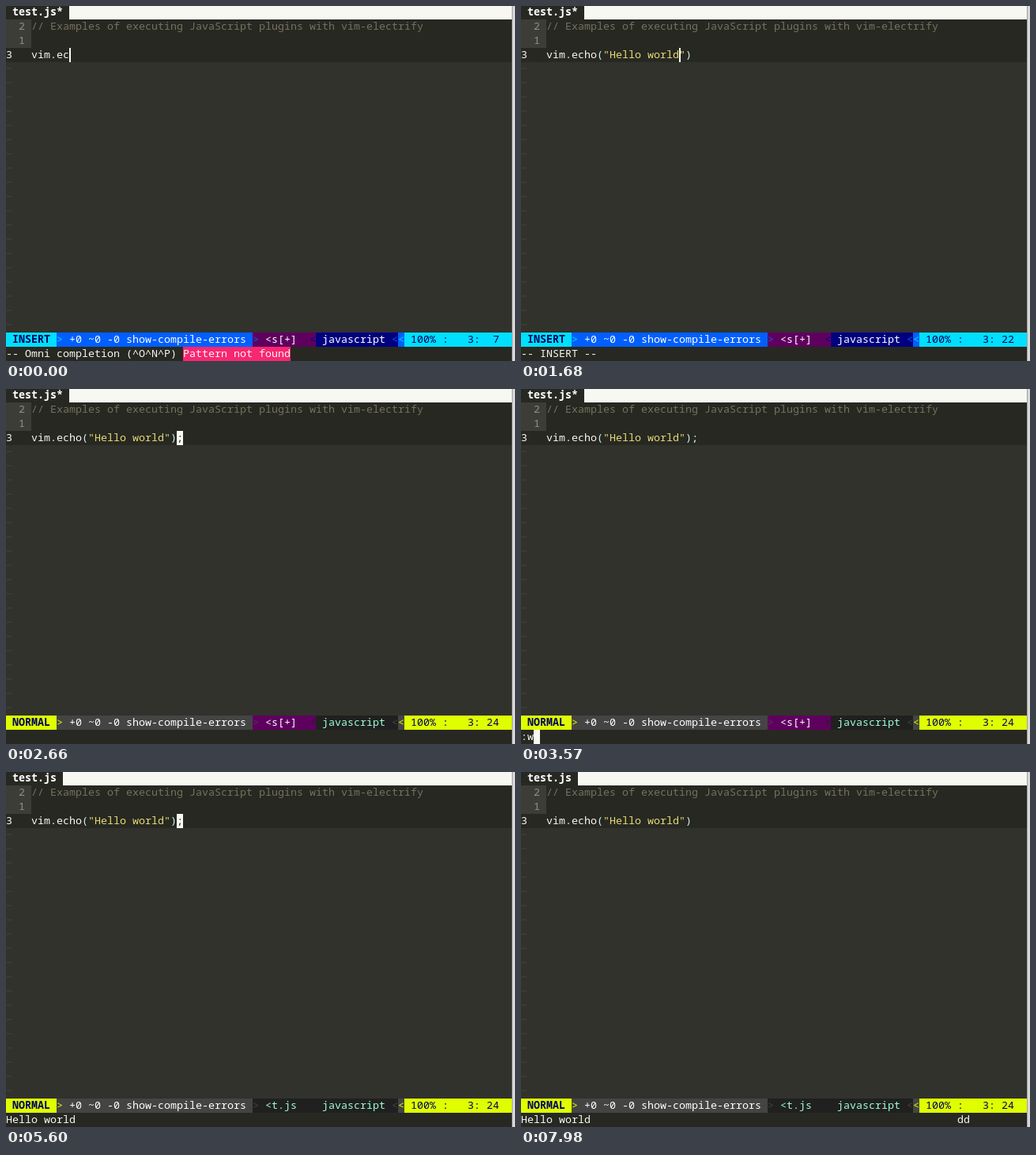
Recreate the animation shown at these times as an HTML page with a canvas. Size 644 px wide and 449 px high, loop 8000 ms.

```html
<!DOCTYPE html>
<html lang="en">
<head>
<meta charset="utf-8">
<title>Editor session</title>
<style>
html, body { margin: 0; width: 100%; height: 100%; overflow: hidden; background: #272822; }
canvas { display: block; }
</style>
</head>
<body>
<canvas id="stage" width="644" height="449"></canvas>
<script>
(() => {
const ctx = document.getElementById("stage").getContext("2d", { alpha: false });
const LOOP = 8000, CW = 8, RH = 18;
const FONT = '13.3333px "Noto Sans Mono", "DejaVu Sans Mono", monospace';
const BG = "#272822", FG = "#f8f8f2", STRING = "#e6db74", PAREN = "#d4f2ee";
const COMMENT = "#75715e", GUTTER = "#3c3d37", EMPTY = "#31322c";
const CALL = 'vim.echo("Hello world")';

const THEMES = {
  INSERT: { a: "#00dfff", b: "#005fff", c: "#000080", ink: "#00005f", text: "#ffffff" },
  NORMAL: { a: "#dfff00", b: "#444444", c: "#202020", ink: "#00005f", text: "#9cffd3" }
};

const initial = {
  code: "vim.ec", col: 7, mode: "INSERT", cursor: "bar",
  dirty: true, msg: "-- Omni completion (^O^N^P) ", error: "Pattern not found", keys: ""
};

// Each step changes part of the state at its time.
const steps = [
  [70, { code: "vim.ech", col: 8 }],
  [210, { code: "vim.echo", col: 9 }],
  [350, { code: "vim.echo()", col: 10, msg: "-- INSERT --", error: "" }],
  [560, { code: 'vim.echo("")', col: 11 }]
];
[770, 840, 980, 1050, 1190, 1260, 1400, 1470, 1540, 1610, 1680].forEach((t, i) => {
  steps.push([t, { code: 'vim.echo("' + "Hello world".slice(0, i + 1) + '")', col: 12 + i }]);
});
steps.push(
  [1960, { mode: "NORMAL", cursor: "block", col: 21, msg: "" }],
  [2170, { mode: "INSERT", cursor: "bar", col: 24, msg: "-- INSERT --" }],
  [2310, { code: CALL + ";", col: 25 }],
  [2590, { mode: "NORMAL", cursor: "block", col: 24 }],
  [2660, { msg: "" }],
  [3290, { cursor: "command", msg: ":" }],
  [3430, { msg: ":w" }],
  [3640, { cursor: "block", dirty: false, msg: '"test.js" 3L, 92C written' }],
  [3920, { cursor: "command", msg: ":" }],
  [4060, { msg: ":S" }],
  [4200, { msg: ":So" }],
  [4270, { msg: ":Sou" }],
  [4410, { msg: ":SourceJs" }],
  [5040, { cursor: "none" }],
  [5250, { cursor: "command" }],
  [5530, { cursor: "block", msg: "" }],
  [5600, { msg: "Hello world" }]
);
for (const [off, on] of [[6160, 6370], [6720, 6930], [7350, 7560]]) {
  steps.push([off, { cursor: "none" }], [on, { cursor: "block" }]);
}
steps.push(
  [7840, { cursor: "half", keys: "d" }],
  [7980, { cursor: "none", code: CALL, keys: "dd" }]
);

function stateAt(t) {
  const s = { ...initial };
  for (const [at, change] of steps) if (at <= t) Object.assign(s, change);
  return s;
}

const rowTop = row => row * RH - 1;

function fill(col, row, count, color) {
  ctx.fillStyle = color;
  ctx.fillRect(col * CW, rowTop(row), count * CW, RH);
}

function write(text, col, row, color, bold) {
  ctx.font = (bold ? "bold " : "") + FONT;
  ctx.fillStyle = color;
  [...text].forEach((ch, i) => ctx.fillText(ch, (col + i) * CW, rowTop(row) + 13));
}

function drawTab(s) {
  const name = " test.js" + (s.dirty ? "* " : " ");
  fill(0, 0, 80, FG);
  fill(0, 0, name.length, BG);
  write(name, 0, 0, "#ffffff", true);
}

function drawCode(s) {
  fill(0, 1, 4, GUTTER);
  fill(0, 2, 4, GUTTER);
  write("2", 2, 1, "#90908a");
  write("1", 2, 2, "#90908a");
  write("// Examples of executing JavaScript plugins with vim-electrify", 4, 1, COMMENT);
  write("3", 0, 3, FG);
  const first = s.code.indexOf('"'), last = s.code.lastIndexOf('"');
  [...s.code].forEach((ch, i) => {
    const quoted = first >= 0 && i >= first && i <= last;
    const color = quoted ? STRING : "()".includes(ch) ? PAREN : FG;
    write(ch, 4 + i, 3, color);
  });
  for (let row = 4; row < 23; row++) {
    fill(0, row, 80, EMPTY);
    write("~", 0, row, "#49483e");
  }
}

function drawStatus(s) {
  const th = THEMES[s.mode], row = 23;
  const fileBg = s.dirty ? "#5f005f" : th.c;
  fill(0, row, 8, th.a);
  fill(8, row, 31, th.b);
  fill(39, row, 10, fileBg);
  fill(49, row, 13, th.c);
  fill(62, row, 1, th.b);
  fill(63, row, 17, th.a);
  write(s.mode, 1, row, th.ink, true);
  write(">", 8, row, th.a);
  write("+0 ~0 -0 show-compile-errors", 10, row, "#ffffff");
  write(">", 39, row, th.b);
  write(s.dirty ? "<s[+]" : "<t.js", 41, row, s.dirty ? "#ffffff" : th.text);
  write("<", 48, row, th.c);
  write("javascript", 50, row, th.text);
  write("<", 61, row, th.b);
  write("<", 62, row, th.a);
  write("100% :   3:" + String(s.col).padStart(3), 64, row, th.ink);
}

function drawMessage(s) {
  write(s.msg, 0, 24, FG);
  if (s.error) {
    fill(s.msg.length, 24, s.error.length, "#f92672");
    write(s.error, s.msg.length, 24, FG);
  }
  write(s.keys, 69, 24, FG);
}

function drawCursor(s) {
  const col = s.col + 3, x = col * CW, y = rowTop(3);
  ctx.fillStyle = "#f8f8f0";
  if (s.cursor === "bar") ctx.fillRect(x, y, 2, RH);
  if (s.cursor === "half") ctx.fillRect(x, y + RH / 2, CW, RH / 2);
  if (s.cursor === "command") fill(s.msg.length, 24, 1, "#f8f8f0");
  if (s.cursor === "block") {
    fill(col, 3, 1, "#f8f8f0");
    write(s.code[s.col - 1] || "", col, 3, BG);
  }
}

function draw(t) {
  const s = stateAt(t);
  ctx.fillStyle = BG;
  ctx.fillRect(0, 0, 644, 449);
  drawTab(s);
  drawCode(s);
  drawStatus(s);
  drawMessage(s);
  drawCursor(s);
  ctx.fillStyle = "#d8d8d8";
  ctx.fillRect(640, 0, 4, 449);
  ctx.fillStyle = "#a0a0a0";
  ctx.fillRect(640, 0, 1, 449);
}

const began = performance.now();
function tick() {
  draw((performance.now() - began) % LOOP);
  requestAnimationFrame(tick);
}
tick();
})();
</script>
</body>
</html>
```
